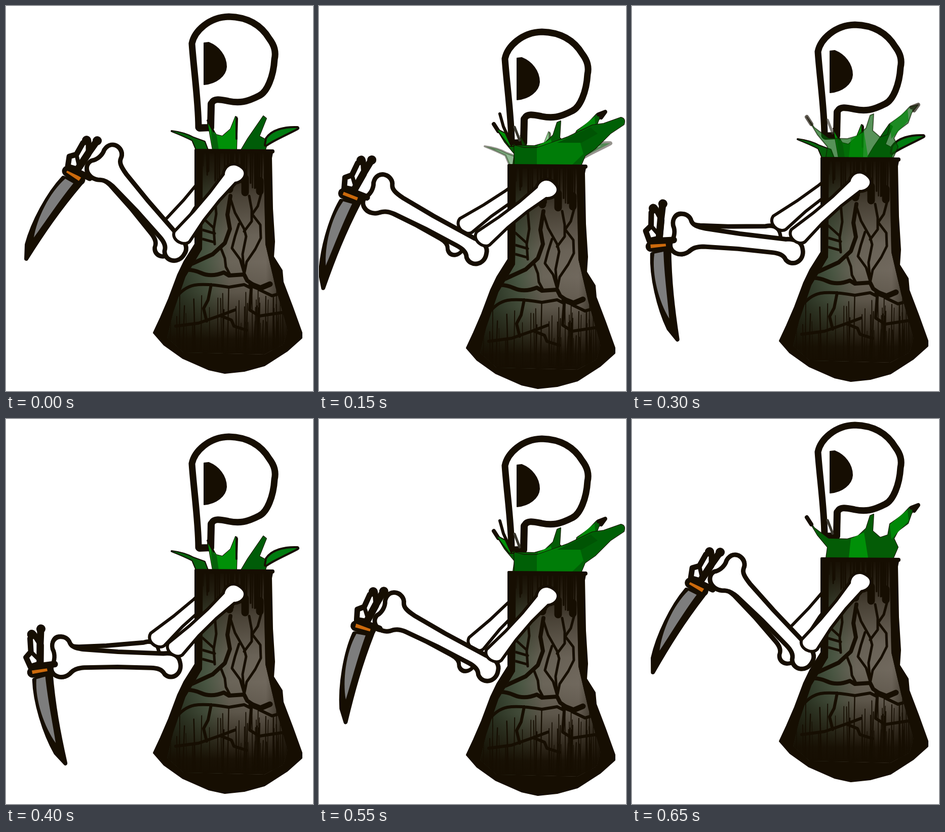
Animation of 606x760 px, one loop 0.7 s. Source, as an HTML page with a canvas:

```html
<!DOCTYPE html>
<html lang="en">
<head>
<meta charset="utf-8">
<title>Stump skeleton</title>
<style>
  html, body { margin: 0; height: 100%; overflow: hidden; background: #fff; }
  canvas { display: block; }
</style>
</head>
<body>
<canvas id="stage" width="606" height="760"></canvas>
<script>
const ctx = document.getElementById('stage').getContext('2d');
const INK = '#160e02', WHITE = '#fff';
const STEP = 50, STEPS = 14;

// step, bob, collar x y, knife turn, hand turn, wrist x y, elbow x y, far elbow x y, far forearm end y
const POSES = [
  [0, 0, 133, 335, 0, 0, 192, 307, 340, 464, 325, 438, 472],
  [1, 10.5, 108, 350, 5, 1, 165, 326, 335, 470, 310, 440, 472],
  [3, 30, 62, 376, 13, 4, 114, 371, 315, 466, 280, 440, 464],
  [5, 18, 49, 452, 37, 24, 93, 434, 317, 461, 280, 433, 447],
  [8, 14, 67, 498, 45, 33, 107, 471, 326, 462, 290, 443, 453],
  [11, 18, 87, 413, 19, 5, 137, 381, 338, 474, 302, 451, 470],
  [13, -9, 127, 332, 2.5, 0, 186, 302, 343, 454, 322, 428, 460]
];

const HEAD = 'M367 74C372 50 400 22 440 21C480 22 505 40 520 65C530 78 533 92 530 105C528 140 515 170 500 177C475 190 460 192 440 188C425 185 408 180 405 195L404 240L380 240C380 190 370 120 367 74Z';
const EYE = 'M391 73L400 72C420 80 435 98 435 120C434 138 415 153 391 155Z';
const STUMP = 'M374 284L526 285L523 300L525 400L529 465L527 495L544 522L546 545L565 595L583 645L583 655L555 680L510 709L470 720L432 724L400 717L350 695L312 668L292 645L306 615L322 578L340 530L352 505L374 470Z';
const BARK = 'M389 288L508 288L512 470L532 555L556 640L548 668L510 688L350 684L318 655L330 605L354 535L387 480Z';
const CRACKS = [
  [8, 'M347 522Q365 518 385 527T430 526L440 532L470 530L476 542L492 553M360 512L408 490L432 468L442 440L437 412L443 375'],
  [5, 'M425 480L432 498L434 515L442 530M470 530L475 505L492 480L503 458L502 432L486 411L497 395L505 365M470 527L462 500L446 478L452 455L460 430M443 380L452 408L470 440L474 455L467 490L470 530M470 445L485 425L485 402L480 375M412 375L415 410L410 440L412 470M388 418L410 438M388 442L412 449M388 460L410 466'],
  [6, 'M332 580Q350 555 372 551T440 555L470 550L482 556M405 550L399 580L390 597L396 622M335 632L380 626L420 612L452 600M425 612L445 620L450 632L475 640M484 558L481 600L500 612L552 604M500 560L525 572L540 568'],
  [15, 'M472 340V368M501 345V366M441 345V362'],
  [11, 'M484 550L502 557L521 549']
];
const UPPER_ARM = 'M-16 -6C-16 -20 2 -22 12 -12L60 -9L110 -10L160 -15C172 -14 178 10 164 15L110 11L60 10L14 12C4 20 -16 18 -16 -6Z';
const FOREARM = 'M-12 -18C-18 -40 10 -42 15 -28C20 -18 30 -15 50 -13L120 -10L215 -9C235 -12 244 -6 246 4C252 22 234 34 222 24C216 14 205 11 190 11L120 11L50 14C30 16 24 22 18 28C4 40 -16 32 -13 18C-6 8 -6 -8 -12 -18Z';
const BLADE = 'M-20 4C-50 36 -80 92 -92 136L-93 164C-60 112 -30 68 14 16Z';
const STEEL = 'M-16 6L0 15C-30 52 -58 95 -78 122C-72 85 -48 34 -16 6Z';

// Each tuft: its strength per step (0-9), then its painted leaves
const TUFTS = [
  { strength: '99946999995000', paint() {
    blob('M327 247Q352 250 370 260L392 268L398 284L376 284L368 265Q352 257 327 247Z', '#06600a', 2);
    blob('M398 228L415 254L427 257L443 243L453 218L457 222L455 284L408 284Z', '#009008', 1);
    line('M398 226L410 248M455 220L455 262', 4);
    blob('M404 244L416 256L420 284L408 284Z', '#06600a');
    blob('M508 217L514 222L500 257L517 266L512 284L464 284L477 262Z', '#005c08', 1);
    blob('M575 241C550 240 526 246 515 262L513 274C530 262 555 252 575 241Z', '#007c10', 4);
  } },
  { strength: '04799962026999', paint() {
    blob('M345 203L360 224L388 245L425 246L446 240L462 225L470 200L477 197L475 230L490 243L505 238L509 216L532 200L548 183L565 179L552 195L545 215L525 230L517 245L525 262L516 283L383 283L386 262L366 238Z', '#045c06', 1);
    blob('M432 245L458 233L466 283L428 283Z', '#009008');
    blob('M509 217L544 188L546 210L512 246Z', '#008808');
    line('M345 203L354 217M552 184L565 179L557 190', 8);
    line('M386 209L396 235', 5, '#3a372e');
  } },
  { strength: '09995000099950', paint() {
    blob('M385 245L405 250L430 250L462 239L492 228L540 205L562 202L596 190Q606 192 602 204L575 222L545 252L525 266L518 283L386 283Z', '#006006', 1);
    blob('M430 250L470 236L512 226L522 262L500 283L430 283Z', '#007c08');
    blob('M470 240L536 210L550 222L518 240Z', '#005404');
    blob('M352 214L372 224L384 246L376 246Z', '#009008', 2);
    line('M357 183L364 208L380 243', 6);
  } }
];

function line(d, width, color = INK) {
  ctx.lineWidth = width;
  ctx.strokeStyle = color;
  ctx.stroke(new Path2D(d));
}

function blob(d, color, outline = 0) {
  if (outline) line(d, outline * 2);
  ctx.fillStyle = color;
  ctx.fill(new Path2D(d));
}

function placed(x, y, degrees, draw, scale = 1) {
  ctx.save();
  ctx.translate(x, y);
  ctx.rotate(degrees * Math.PI / 180);
  ctx.scale(scale, 1);
  draw();
  ctx.restore();
}

function bone(d, length, outline, x1, y1, x2, y2) {
  const dx = x2 - x1, dy = y2 - y1;
  placed(x1, y1, Math.atan2(dy, dx) * 180 / Math.PI,
    () => blob(d, WHITE, outline), Math.hypot(dx, dy) / length);
}

const forearm = (...ends) => bone(FOREARM, 237, 9, ...ends);
const upperArm = (...ends) => bone(UPPER_ARM, 174, 6, ...ends);

function gradient(x1, y1, x2, y2, stops) {
  const g = ctx.createLinearGradient(x1, y1, x2, y2);
  for (const [at, color] of stops) g.addColorStop(at, color);
  return g;
}

function drawStump() {
  blob(STUMP, INK, 2);
  ctx.save();
  ctx.clip(new Path2D(BARK));
  blob(BARK, gradient(325, 0, 560, 0,
    [[0, '#263322'], [.3, '#4c5a46'], [.5, '#6f695d'], [.8, '#756d62'], [1, '#2c261b']]));
  const shade = a => `rgba(22,14,2,${a})`;
  blob(BARK, gradient(0, 285, 0, 685, [[0, shade(1)], [.1, shade(.8)], [.22, shade(.45)],
    [.42, shade(.1)], [.55, shade(.05)], [.7, shade(.22)], [.82, shade(.6)], [.93, shade(.96)], [1, shade(1)]]));
  let seed = 7;
  const random = () => (seed = seed * 16807 % 2147483647) / 2147483647;
  for (let i = 0; i < 55; i++) {
    const x = 325 + random() * 230, y = 555 + random() * 75;
    line(`M${x} ${y}L${x - 3 + random() * 6} 680`, 1 + random() * 1.5);
  }
  for (let i = 0; i < 28; i++) {
    const x = 388 + random() * 122;
    line(`M${x} 286L${x} ${315 + random() * 45}`, 2 + random() * 3);
  }
  for (const [width, d] of CRACKS) line(d, width);
  ctx.restore();
  line('M377 287L526 287', 8);
}

function drawHead() {
  blob(HEAD, WHITE);
  line(HEAD, 13);
  line('M405 193L404 240L382 241', 14);
  blob(EYE, INK, 1);
}

function drawKnife() {
  blob(BLADE, INK, 4);
  blob(STEEL, '#7d7d7d');
  line('M-12 -9L13 8', 21);
  ctx.lineCap = 'butt';
  line('M-12 -10L13 7', 8, '#cc6a0c');
  ctx.lineCap = 'round';
}

function drawHand() {
  const fingers = 'M-11 -18L-8 -38L6 -42L19 -65L30 -68L30 -42L10 -12Z';
  blob(fingers, WHITE);
  line(fingers, 11);
  line('M6 -42L10 -24', 8);
  line('M8 -12L29 -44L46 -68', 14);
  line('M-10 -16L32 4', 13);
  line('M26 -70h.1M47 -69h.1', 18);
}

// Monotone cubic through the cyclic poses
function poseAt(step) {
  const count = POSES.length;
  const value = (k, c) => POSES[(k + count) % count][c]
    + (c ? 0 : Math.floor(k / count) * STEPS);
  const rate = (k, c) => (value(k + 1, c) - value(k, c)) / (value(k + 1, 0) - value(k, 0));
  const slope = (k, c) => {
    const a = rate(k - 1, c), b = rate(k, c);
    return a * b > 0 ? 2 * a * b / (a + b) : 0;
  };
  let k = count - 1;
  while (POSES[k][0] > step) k--;
  const span = value(k + 1, 0) - value(k, 0), u = (step - value(k, 0)) / span, v = 1 - u;
  return POSES[k].map((p, c) => p * v * v * (1 + 2 * u) + value(k + 1, c) * u * u * (3 - 2 * u)
    + span * u * v * (slope(k, c) * v - slope(k + 1, c) * u));
}

function draw(step) {
  const [, bob, collarX, collarY, knife, hand, wristX, wristY, elbowX, elbowY, farX, farY, farEnd] = poseAt(step);
  ctx.fillStyle = WHITE;
  ctx.fillRect(0, 0, 606, 760);
  ctx.lineCap = ctx.lineJoin = 'round';

  forearm(wristX, wristY, farX, farEnd);
  upperArm(425, 312 + bob, farX, farY);

  placed(0, bob, 0, () => {
    drawHead();
    for (const tuft of TUFTS) {
      ctx.globalAlpha = tuft.strength[step] / 9;
      tuft.paint();
    }
    ctx.globalAlpha = 1;
    drawStump();
  });

  forearm(wristX, wristY, elbowX + 5, elbowY + 15);
  placed(collarX, collarY, -knife, drawKnife);
  placed(collarX, collarY, -hand, drawHand);
  upperArm(450, 330 + bob, elbowX, elbowY);
}

function tick() {
  draw(Math.floor(performance.now() / STEP) % STEPS);
  requestAnimationFrame(tick);
}
tick();
</script>
</body>
</html>
```
